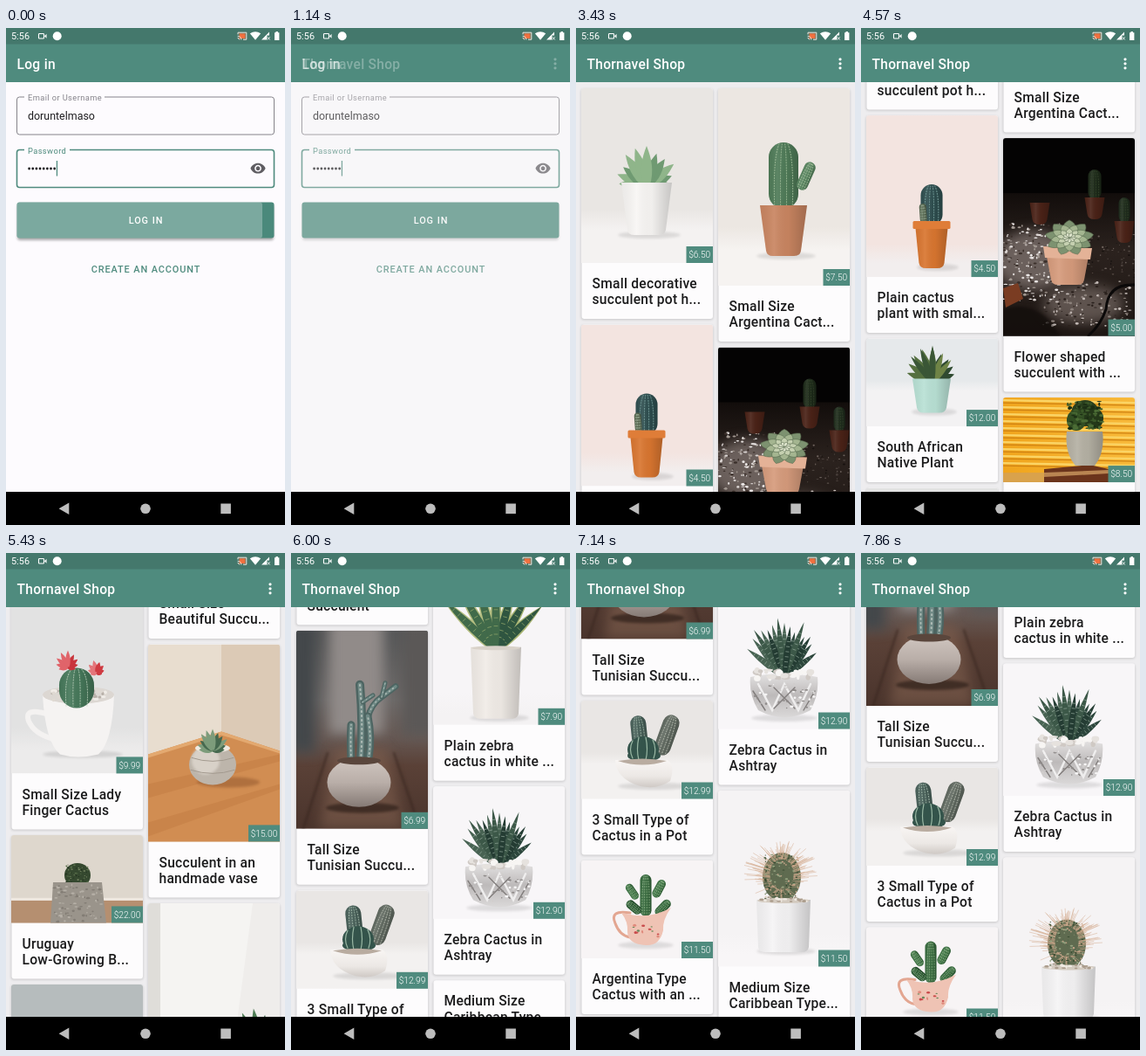
Write an HTML page that moves like this. It is 320 px wide and 569 px high and loops after 8000 ms.

```html
<!DOCTYPE html>
<html lang="en">
<head>
<meta charset="utf-8">
<title>Plant shop</title>
<style>
html, body { margin: 0; width: 100%; height: 100%; overflow: hidden; background: #fdfbfe; }
svg { display: block; }
text { font-family: Roboto, "Noto Sans", sans-serif; white-space: pre; }
.m { font-weight: 500; }
.h { font-size: 15.6px; font-weight: 500; letter-spacing: .27px; }
.c { font-size: 15.6px; font-weight: 500; letter-spacing: .25px; fill: #1b1b1c; }
.p { font-size: 10.2px; font-weight: 300; fill: #fff; }
.soft { filter: blur(1.6px); }
.haze { filter: blur(7px); }
</style>
</head>
<body>
<svg id="stage" width="100%" height="100%" viewBox="0 0 320 569"></svg>
<script>
const TICK = 1000 / 7, LOOP = 8000;
const TEAL = '#4f8b7e', CARD_W = 151, TEXT_H = 64, GAP = 6.5, TOP = 69;
const SHOP = 'Thornavel Shop', USER = 'doruntelmaso';

// ---- drawing helpers, all returning markup ----
const rect = (x, y, w, h, c, more = '') => `<rect x="${x}" y="${y}" width="${w}" height="${h}" fill="${c}" ${more}/>`;
const oval = (x, y, rx, ry, c, more = '') => `<ellipse cx="${x}" cy="${y}" rx="${rx}" ry="${ry}" fill="${c}" ${more}/>`;
const path = (d, c, more = '') => `<path d="${d}" fill="${c}" ${more}/>`;
const line = (d, c, w, more = '') => path(d, 'none', `stroke="${c}" stroke-width="${w}" stroke-linecap="round" ${more}`);
const text = (x, y, s, more = '') => `<text x="${x}" y="${y}" ${more}>${s}</text>`;
const dots = (x, y, n, step, r, c) => Array.from({ length: n }, (_, i) => oval(x + i * step, y, r, r, c)).join('');

// Registers a gradient of [offset, colour, opacity] stops, returns its paint
const defs = [];
function grad(stops, across = false) {
  const id = 'g' + defs.length;
  const s = stops.map(([o, c, a = 1]) => `<stop offset="${o}" stop-color="${c}" stop-opacity="${a}"/>`).join('');
  defs.push(`<linearGradient id="${id}" x2="${+across}" y2="${+!across}">${s}</linearGradient>`);
  return `url(#${id})`;
}
const ROUND = grad([[0, '#000', .05], [.3, '#fff', .08], [.6, '#000', .03], [1, '#000', .2]], true);

function randoms(seed) {
  return () => (seed = (seed * 9301 + 49297) % 233280) / 233280;
}
function specks(seed, n, x, y, w, h, r, colors) {
  const rnd = randoms(seed);
  let s = '';
  for (let i = 0; i < n; i++)
    s += oval((x + rnd() * w).toFixed(1), (y + rnd() * h).toFixed(1), (r * (.4 + rnd())).toFixed(1), (r * (.3 + rnd() * .6)).toFixed(1), colors[i % colors.length]);
  return s;
}
// Leaves fanned around one root, outer ones first
function fan(x, y, n, spread, len, w, c1, c2, stripe = '') {
  const angles = Array.from({ length: n }, (_, i) => (i / (n - 1) - .5) * spread);
  angles.sort((a, b) => Math.abs(b) - Math.abs(a));
  return angles.map((a, i) => {
    const l = len * (.66 + .34 * Math.cos(a * Math.PI / 180)) * (i % 2 ? .86 : 1);
    let s = path(`M-${w * .4} 0C-${w} ${-l * .4} -${w * .6} ${-l * .7} 0 ${-l}C${w * .6} ${-l * .7} ${w} ${-l * .4} ${w * .4} 0z`, i % 2 ? c1 : c2);
    if (stripe) for (let k = 2; k < 9; k++) s += line(`M${-w * .3} ${-l * k / 10}h${w * .6}`, stripe, .7);
    return `<g transform="translate(${x} ${y}) rotate(${a})">${s}</g>`;
  }).join('');
}
// Rings of leaves seen from slightly above
function rosette(x, y, r, colors) {
  let s = '';
  colors.forEach((c, ring) => {
    for (let i = 0; i < 9; i++) {
      const l = r * (1 - ring * .24), w = l * .34;
      s += path(`M0 0C-${w} ${-l * .4} -${w} ${-l * .8} 0 ${-l}C${w} ${-l * .8} ${w} ${-l * .4} 0 0z`, c,
        `transform="rotate(${i * 40 + ring * 20})" stroke="#53664a" stroke-width=".6"`);
    }
  });
  return `<g transform="translate(${x} ${y}) scale(1 .72)">${s}</g>`;
}
function cactus(x, y, w, h, c, rib, turn = 0) {
  let s = rect(-w / 2, -h, w, h, c, `rx="${w / 2}"`) + rect(-w / 2, -h, w, h, ROUND, `rx="${w / 2}"`);
  for (let i = 1; i < 5; i++) {
    const k = (i / 5 - .5) * w;
    s += line(`M${k * .5} ${2 - h}Q${k * 1.2} ${-h * .75} ${k} -2`, rib, .9, 'stroke-dasharray="1 2"');
  }
  return `<g transform="translate(${x} ${y}) rotate(${turn})">${s}</g>`;
}
function pot(x, y, w, base, h, c) {
  const d = `M${x - w / 2} ${y}h${w}L${x + base / 2} ${y + h - 6}q-1 6 -8 6h${16 - base}q-7 0 -8 -6z`;
  return path(d, c) + path(d, ROUND);
}
// Wall and floor meeting in a soft horizon
const room = (h, wall, floorY, floor) =>
  rect(0, 0, CARD_W, h, grad([[0, wall], [floorY / h - .06, wall], [floorY / h + .06, floor]]));
const shade = (x, y, rx) => oval(x, y, rx, 4, '#000', 'opacity=".1" class="soft"');

// ---- pictures, in card coordinates ----
const art = {
  decor: () => room(200, '#e9e6e3', 150, '#f4f2f1') + shade(78, 168, 36) +
    fan(75, 112, 11, 170, 46, 9, '#6f9a72', '#8fb58a') + pot(75, 108, 58, 44, 60, '#f8f6f4'),
  pampa: () => room(226, '#ece7e2', 172, '#f6f3f1') + shade(78, 192, 34) +
    cactus(75, 138, 34, 76, '#4f7b58', '#a9c3a0') + cactus(94, 116, 13, 34, '#5b8762', '#a9c3a0', 24) + pot(75, 134, 54, 40, 58, '#c98561'),
  plain: () => room(185, '#f3e4e0', 158, '#f2eeee') + shade(82, 174, 24) +
    cactus(75, 126, 25, 47, '#2f4f50', '#7fa9a4') + cactus(66, 123, 8, 22, '#55664f', '#9db19a', -4) +
    pot(75, 124, 38, 29, 51, '#d97630') + rect(53.5, 121, 43, 9, '#df7d38', 'rx="1.5"'),
  flower: () => {
    const back = (x, y) => pot(x, y, 23, 17, 25, '#4a2217');
    return rect(0, 0, CARD_W, 227, '#040303') + rect(0, 63, CARD_W, 164, grad([[0, '#120d0b'], [.4, '#2b221e'], [1, '#1d1613']])) +
      oval(34, 140, 44, 34, '#6b605c', 'class="haze"') + oval(92, 190, 46, 22, '#5e534e', 'class="haze"') +
      specks(7, 200, 0, 98, 66, 88, 1.7, ['#d9d3d1', '#a0968f', '#3a2f2a', '#ece8e7']) +
      specks(31, 150, 46, 164, 100, 52, 1.6, ['#c4bbb7', '#8b807a', '#2a211d']) +
      specks(13, 60, 96, 110, 55, 50, 1.2, ['#4d433e', '#6d625c', '#17110f']) +
      path('M0 227V196Q30 186 52 208L66 227z', '#120d0b', 'opacity=".7" class="soft"') +
      cactus(105, 70, 15, 34, '#1d2a19', '#35452c') + back(105, 68) + back(42, 74) +
      cactus(139, 96, 13, 28, '#1f2c1d', '#35452c') + back(139, 95) +
      path('M0 172l17 -6 6 18 -20 10z', '#7a3c22') +
      line('M151 168Q120 166 118 196Q112 214 98 226', '#0b0909', 3) +
      pot(74, 130, 50, 38, 38, '#d69b7c') + path('M46 124L102 126L100 139L48 137z', '#e4b297') +
      rosette(76, 114, 28, ['#7d9270', '#a4b590', '#c5d0b0', '#dde3cb']);
  },
  blinds: () => {
    let s = rect(0, 0, CARD_W, 97, grad([[0, '#f0a41c'], [1, '#f8b93a']], true));
    for (let y = 3; y < 80; y += 8) s += line(`M0 ${y}L151 ${y + 3}`, '#fbd465', 2.4) + line(`M0 ${y + 3}L151 ${y + 6}`, '#cf8212', 1.2);
    return s + rect(0, 86, CARD_W, 11, '#d9a24c') +
      path('M47 82l52 -5 22 5v15H47z', '#6b341c') + path('M47 86l74 -3v4l-74 4z', '#b98552') +
      oval(94, 18, 16, 15, '#2a3f1e') + oval(84, 26, 11, 12, '#314d23') + oval(104, 24, 11, 12, '#243819') +
      specks(3, 80, 74, 4, 40, 33, 2.4, ['#4b6c35', '#1c2f14', '#3a5829']) +
      path('M73 39h41q3 24 -9 39H83q-13 -15 -10 -39z', '#b5b1a4') + path('M73 39h41q3 24 -9 39H83q-13 -15 -10 -39z', ROUND);
  },
  cup: () => room(212, '#e2e2e2', 172, '#ecebeb') + shade(82, 190, 46) +
    line('M42 144Q14 136 20 152Q26 166 46 172', '#f4f2f1', 6) +
    path('M36 122H118Q116 176 100 190Q76 196 56 190Q39 176 36 122z', '#f5f3f2') +
    oval(77, 122, 41, 10, '#dcd7d2') + specks(5, 40, 42, 116, 68, 12, 2.6, ['#f0ece7', '#b8b0a8', '#dfd9d2']) +
    cactus(75, 137, 40, 46, '#46785a', '#c7d9c4') +
    fan(65, 90, 9, 210, 19, 4, '#c9353c', '#e0646a') + fan(98, 96, 8, 220, 14, 4, '#cf3b42', '#e4757a'),
  stone: () => rect(0, 0, CARD_W, 101, '#ded7cd') + rect(0, 73, CARD_W, 28, '#b58f70') + rect(0, 72, CARD_W, 3, '#efe8e0') +
    oval(76, 46, 15, 14, '#35482f') + specks(9, 60, 63, 34, 26, 24, 1, ['#7d8c68', '#1f2e1c', '#59704b']) +
    path('M48 54H104L109 101H45z', '#9a948b') + specks(12, 90, 49, 57, 55, 43, 1.6, ['#b5afa6', '#827c74']),
  misty: () => room(226, '#b6bcbd', 178, '#a9adac') + shade(75, 192, 36) +
    fan(75, 130, 11, 150, 68, 8, '#4e6e5b', '#6c8b74') + pot(75, 128, 58, 46, 66, '#e6e3df'),
  tall: () => {
    const limb = (d, w) => line(d, '#4d6562', w) + line(d, '#6f8985', w * .5) + line(d, '#b0bdb7', w * .2, 'stroke-dasharray="1 4"');
    return rect(0, 0, CARD_W, 227, grad([[0, '#565758'], [.35, '#6d6a69'], [.55, '#655752'], [.68, '#5a4137'], [1, '#4a342c']])) +
      rect(38, -10, 62, 128, '#918b89', 'class="haze"') + rect(-8, -10, 30, 150, '#43474a', 'class="haze"') +
      rect(122, -10, 40, 130, '#5b5857', 'class="haze"') + path('M44 134L26 227H124L104 134z', '#80604f', 'opacity=".6" class="haze"') +
      line('M36 140L8 227M112 140L142 227', '#38261f', 1.6, 'class="soft"') + oval(76, 203, 42, 6, '#241813', 'opacity=".6" class="soft"') +
      limb('M63 148Q62 126 63 108', 9) + limb('M74 148Q77 110 73 62', 10) + limb('M82 100Q86 84 98 76L114 64', 7) +
      limb('M76 82L88 74M98 76L102 60', 5) + limb('M83 146Q87 122 82 98', 9) +
      oval(72, 174, 36.5, 28, grad([[0, '#d0c6c0'], [.5, '#b9aea8'], [1, '#857a75']])) + oval(72, 149, 25, 4.5, '#5a463c');
  },
  three: () => room(113, '#e9e6e4', 66, '#f3f1f0') + shade(84, 98, 42) +
    cactus(68, 52, 18, 35, '#4a625b', '#a6beae', -6) + cactus(90, 62, 19, 48, '#626b62', '#b9beb2', 20) +
    oval(71, 56, 18, 15, '#34544b') + oval(72, 63, 19, 7, '#34544b') +
    line('M59 46Q54 56 59 66M66 42Q63 56 66 68M74 42Q77 56 74 68M82 45Q87 56 83 66', '#9ab8a4', 1.2) +
    path('M39 68H99Q108 74 102 92Q88 102 68 98Q40 90 39 68z', grad([[0, '#f8f5f3'], [.6, '#ece8e5'], [1, '#cfc9c5']])) +
    path('M42 69Q70 78 98 69Q70 64 42 69z', '#b9aca0'),
  pitcher: () => rect(0, 0, CARD_W, 112, '#f7f4f5') + shade(74, 97, 32) +
    cactus(74, 64, 13, 48, '#376a3e', '#8fb488') + cactus(64, 44, 9, 20, '#3f7546', '#8fb488', -34) +
    cactus(84, 42, 10, 22, '#3f7546', '#8fb488', 28) + cactus(68, 60, 10, 20, '#2f5d37', '#8fb488', -50) + cactus(86, 62, 10, 22, '#376a3e', '#8fb488', 44) +
    line('M56 60Q32 56 39 72Q44 86 56 88', '#e3a691', 3) +
    path('M52 61Q78 68 103 54Q93 68 94 80Q90 98 74 97Q54 96 53 82Q54 70 46 60z', '#efc3b4') +
    specks(4, 14, 60, 74, 30, 14, 1.8, ['#c94b4b', '#e08a7c', '#6b8a5c']),
  table: () => rect(0, 0, CARD_W, 227, '#e8ddcf') + path('M84 0H151V126L84 102z', '#dccab6') +
    path('M0 126L84 100L151 122V227H0z', '#d18d52') + path('M0 160L151 126V134L0 176zM0 204L151 160V166L0 220z', '#c27c42', 'opacity=".5"') +
    path('M0 126L84 100L151 122V125L84 104L0 130z', '#e3a970') + oval(92, 158, 36, 6, '#7d4521', 'opacity=".4" class="soft"') +
    oval(74, 138, 27, 23, '#bdb5ab') + oval(66, 133, 16, 16, '#d8d1c8', 'class="soft"') +
    line('M50 130Q74 138 98 130M49 144Q74 152 99 144', '#a39a8f', 1) + oval(74, 119, 20, 5, '#efe9e0') + fan(74, 121, 11, 180, 24, 5, '#46694f', '#7d9c7b'),
  aloe: () => rect(0, 0, CARD_W, 226, '#efedeb') + path('M0 0H14V226H0z', '#dfddd9') + path('M14 0H120L90 226H14z', '#f5f4f2') +
    fan(128, 172, 8, 110, 52, 8, '#2f5a3c', '#4d7b54') + pot(126, 168, 44, 36, 44, '#dcd3c8'),
  zebra: () => room(201, '#f7f5f7', 176, '#f4f2f3') + shade(76, 193, 34) +
    fan(72, 116, 7, 92, 96, 9, '#a9b573', '#b4bd80') + fan(72, 116, 7, 92, 94, 6.6, '#2f5540', '#416a4a', '#93a86c') +
    pot(72, 112, 58, 52, 82, '#f1ece7') + oval(72, 113, 28, 2.5, '#d9d2c9'),
  ashtray: () => rect(0, 0, CARD_W, 152, '#f8f6f8') + shade(76, 139, 38) +
    fan(76, 92, 9, 106, 62, 5.6, '#2c463c', '#486353', '#8ca294') + fan(76, 92, 6, 66, 68, 5.4, '#243c33', '#3c5848', '#8ca294') +
    path('M37 92Q75 84 114 92Q116 112 106 130Q76 146 46 130Q35 112 37 92z', grad([[0, '#e4e2e2'], [.5, '#bdbaba'], [1, '#dad8d8']])) +
    specks(15, 30, 44, 84, 62, 10, 4, ['#f7f5f3', '#e6e2de', '#cfc9c4']) +
    line('M46 100L62 130L76 100L92 130L106 100', '#efeeee', 2.4) + line('M64 104L88 128M88 104L64 128M40 108L54 130M111 108L98 130', '#807c7b', 1.4) +
    specks(18, 50, 40, 100, 72, 34, 1.6, ['#f6f5f5', '#8f8b8a', '#d0cdcc']),
  carib: () => {
    let spines = '';
    const rnd = randoms(21);
    for (let i = 0; i < 150; i++) {
      const a = rnd() * 6.28, r = 22 + rnd() * 22, x = 73 + Math.cos(a) * 14, y = 96 + Math.sin(a) * 18;
      spines += `M${x.toFixed(1)} ${y.toFixed(1)}L${(73 + Math.cos(a) * r).toFixed(1)} ${(92 + Math.sin(a) * r * .8).toFixed(1)}`;
    }
    return room(202, '#f5f3f4', 176, '#f8f6f7') + shade(78, 184, 34) +
      oval(73, 99, 22, 28, '#5f6b50') + line(spines, '#d2ab8e', .5) +
      specks(17, 150, 53, 73, 40, 52, 1.3, ['#37492f', '#93a07e', '#c9a58a', '#55664a']) +
      pot(75, 125, 62, 58, 60, '#f5f4f5') + oval(75, 126, 30, 3, '#d3cabf') + specks(8, 26, 48, 122, 54, 6, 2, ['#efe9e2', '#ab9c8c']);
  },
  agave: () => room(101, '#e6e9eb', 54, '#f3f2f3') + shade(78, 84, 26) +
    fan(76, 50, 9, 140, 40, 6.4, '#2f4a30', '#55703f') + fan(76, 50, 5, 80, 42, 5, '#6f8446', '#3a5636') + pot(75, 46, 44, 34, 39, '#b9e1d5')
};

// column, picture height, price, title lines, picture
const cards = [
  [0, 200, '6.50', 'Small decorative', 'succulent pot h...', 'decor'],
  [1, 226, '7.50', 'Small Size', 'Argentina Cact...', 'pampa'],
  [0, 185, '4.50', 'Plain cactus', 'plant with smal...', 'plain'],
  [1, 226.5, '5.00', 'Flower shaped', 'succulent with ...', 'flower'],
  [1, 97, '8.50', 'Small Size', 'Beautiful Succu...', 'blinds'],
  [1, 226, '15.00', 'Succulent in an', 'handmade vase', 'table'],
  [0, 100.5, '12.00', 'South African', 'Native Plant', 'agave'],
  [0, 212, '9.99', 'Small Size Lady', 'Finger Cactus', 'cup'],
  [0, 100.5, '22.00', 'Uruguay', 'Low-Growing B...', 'stone'],
  [1, 226, '9.50', 'Long Leaf', 'Aloe Plant', 'aloe'],
  [0, 226, '8.90', 'Mexican Type', 'Succulent', 'misty'],
  [1, 201, '7.90', 'Plain zebra', 'cactus in white ...', 'zebra'],
  [0, 227, '6.99', 'Tall Size', 'Tunisian Succu...', 'tall'],
  [1, 151.5, '12.90', 'Zebra Cactus in', 'Ashtray', 'ashtray'],
  [0, 112.5, '12.99', '3 Small Type of', 'Cactus in a Pot', 'three'],
  [1, 201.5, '11.50', 'Medium Size', 'Caribbean Type...', 'carib'],
  [0, 112, '11.50', 'Argentina Type', 'Cactus with an ...', 'pitcher']
].map(([col, h, price, a, b, pic]) => ({ col, h, price, a, b, pic, loads: 2900 }));
// the last row is fetched only when it scrolls into view
cards.slice(-2).forEach(c => c.loads = 6050);

const colX = [6, 163], feet = [TOP, TOP];
cards.forEach((c, i) => {
  c.y = feet[c.col];
  feet[c.col] += c.h + TEXT_H + GAP;
  c.early = { x: colX[i % 2], y: TOP + (i >> 1) * (TEXT_H + GAP) };
});

function cardMarkup(c, i) {
  const w = c.price.length > 4 ? 36 : 30.5;
  return `<g id="card${i}">` +
    rect(-.2, 1, CARD_W + .4, 0, '#000', 'class="box soft" rx="3" opacity=".16"') + rect(.5, 0, CARD_W - .5, 0, '#fdfcfd', 'class="box" rx="3"') +
    `<g class="pic" clip-path="url(#corner)"><svg width="${CARD_W}" height="${c.h}">${art[c.pic]()}</svg>` +
    rect(CARD_W - w, c.h - 19, w, 19, TEAL) + text(CARD_W - w / 2, c.h - 5.8, '$' + c.price, 'class="p" text-anchor="middle"') + '</g>' +
    `<g class="cap">${text(12.5, 29.2, c.a, 'class="c"')}${text(12.5, 47.4, c.b, 'class="c"')}</g></g>`;
}

const field = (y, c, w, label, lw) =>
  rect(12.5, y, 295, 43, 'none', `rx="3" stroke="${c}" stroke-width="${w}"`) + rect(21, y - 3, lw, 6, '#fdfbfe') +
  text(25, y + 4, label, `font-size="9.3" letter-spacing=".4" fill="${c}"`);
const EYE = 'M12 4.5C7 4.5 2.73 7.61 1 12c1.73 4.39 6 7.5 11 7.5s9.27-3.11 11-7.5c-1.73-4.39-6-7.5-11-7.5zM12 17c-2.76 0-5-2.24-5-5s2.24-5 5-5 5 2.24 5 5-2.24 5-5 5zm0-8c-1.66 0-3 1.34-3 3s1.34 3 3 3 3-1.34 3-3-1.34-3-3-3z';

const login = '<g id="login">' + rect(0, 62, 320, 470, '#fdfbfe') +
  field(79, '#85838a', 1, 'Email or Username', 92) + text(25, 105.3, USER, 'font-size="12.45" fill="#1e1d20"') +
  field(139.5, TEAL, 1.6, 'Password', 52) + dots(26.6, 161, 8, 4.15, 1.4, '#1e1d20') +
  rect(57.8, 152, 1.3, 17.5, TEAL, 'id="caret"') + path(EYE, '#5f5d62', 'transform="translate(279.7 151.3) scale(.778)"') +
  rect(13, 202, 294, 41, '#000', 'id="lift" class="soft" rx="3"') + rect(12.5, 199.5, 295, 41, '#4a897b', 'rx="3"') +
  rect(12.5, 199.5, 295, 41, '#fff', 'id="ripple" rx="3"') +
  text(160.5, 224, 'LOG IN', 'class="m" font-size="10.9" letter-spacing=".95" fill="#fff" text-anchor="middle"') +
  text(160.5, 280, 'CREATE AN ACCOUNT', `class="m" font-size="10.9" letter-spacing=".9" fill="${TEAL}" text-anchor="middle"`) + '</g>';

const sheet = '<g id="sheet">' + rect(0, 334, 320, 198, '#f8f7fa') + oval(21.5, 356, 9, 9, '#4285f4') +
  text(37, 360, 'Save password to Zorund?', 'font-size="12.5" fill="#202124"') +
  text(12.5, 391, 'Username', 'font-size="10.1" fill="#77777c"') + text(12.5, 410, USER, 'font-size="11.6" fill="#202124"') +
  text(12.5, 438, 'Password', 'font-size="10.1" fill="#77777c"') + dots(16, 452.5, 8, 7.7, 1.15, '#202124') +
  text(189.5, 505, 'Not now', 'class="m" font-size="10.9" fill="#1a73e8"') +
  rect(242, 486, 63, 29.5, '#146fec', 'rx="3.5"') + rect(242, 486, 63, 29.5, '#fff', 'id="press" rx="3.5"') +
  text(273.5, 505, 'Save', 'class="m" font-size="10.9" fill="#fff" text-anchor="middle"') + '</g>';

const bars = rect(0, 0, 320, 62, TEAL) + rect(0, 0, 320, 18.5, '#44786c') +
  text(6, 13.2, '5:56', 'font-size="10.9" fill="#fff"') +
  rect(37.5, 6.5, 6, 5.5, 'none', 'rx=".8" stroke="#fff" stroke-width="1.1"') + path('M44 9.2l2.5 -2.4v5z', '#fff') +
  oval(58.7, 9.2, 5, 5, '#fff') +
  rect(267.5, 6.3, 7, 5.8, '#f0703f') + line('M266 7V5.2h9.8v8h-3.4M266 9.3q3.6 0 3.8 3.7M266 11.4q1.5 0 1.6 1.6', '#f8e6de', 1) +
  path('M279.8 6.3Q286 2.2 292.2 6.3L286 13.8z', '#fff') + path('M293 13.6L302 4.6V8.6H299.4V13.6z', '#fff') +
  line('M300.4 10.6l2 2.6m0 -2.6l-2 2.6', '#fff', .8) + path('M308 5.2h1.5V4h2.4v1.2h1.5v8.8H308z', '#fff') +
  text(12.5, 46.5, 'Log in', 'id="loginTitle" class="h" fill="#fff"') +
  '<g id="shopTitle">' + text(12.5, 46.5, SHOP, 'class="h" fill="#fff"') +
  [35.8, 40.8, 45.8].map(y => oval(303, y, 1.6, 1.6, '#fff')).join('') + '</g>';

const nav = rect(0, 531, 320, 38, '#000') + path('M60.6 550.3L72.3 543.6v13.4z', '#bdbdbd') +
  oval(160, 550.3, 5.8, 5.8, '#bdbdbd') + rect(246.3, 544.5, 11.6, 11.6, '#bdbdbd');

const shop = '<g id="shop">' + rect(0, 62, 320, 470, '#eeedef') + '<g id="list">' + cards.map(cardMarkup).join('') + '</g></g>';
const corner = `<clipPath id="corner">${rect(0, 0, CARD_W, 300, '#000', 'rx="3"')}</clipPath>`;
const stage = document.getElementById('stage');
stage.innerHTML = `<defs>${corner}${defs.join('')}</defs>` + login + shop + sheet + bars + nav;

const $ = id => document.getElementById(id);
const set = (el, a) => { for (const k in a) el.setAttribute(k, a[k]); };
const clamp = v => Math.max(0, Math.min(1, v));
const ramp = (t, a, b) => clamp((t - a) / (b - a));
cards.forEach((c, i) => {
  c.el = $('card' + i);
  c.box = c.el.querySelectorAll('.box');
  c.art = c.el.querySelector('.pic');
  c.cap = c.el.querySelector('.cap');
});

// time, list offset, speed in px per ms
const flings = [[4200, 0, .1], [4571.4, 239.4, .8], [5428.6, 725.6, .4], [6000, 1427.2, .5], [7142.9, 1644.5, 0], [7857.1, 1568, -.06], [8000, 1562, 0]];
function scrollAt(t) {
  if (t <= flings[0][0]) return 0;
  const i = Math.max(1, flings.findIndex(f => t <= f[0] + .1));
  const [t0, y0, v0] = flings[i - 1], [t1, y1, v1] = flings[i];
  const d = t1 - t0, u = (t - t0) / d, w = 1 - u;
  return y0 * (1 + 2 * u) * w * w + v0 * d * u * w * w + y1 * u * u * (3 - 2 * u) - v1 * d * u * u * w;
}

function draw(ms) {
  const t = Math.floor((ms + 5) / TICK) * TICK;

  const toShop = ramp(t, 1020, 1420);
  set($('shop'), { opacity: toShop });
  set($('shopTitle'), { opacity: toShop });
  set($('loginTitle'), { opacity: 1 - toShop });

  const fade = 1 - ramp(t, 140, 420);
  set($('ripple'), { width: t < 100 ? 281.5 : 295, opacity: .27 * fade });
  set($('lift'), { opacity: .2 + .12 * fade });
  set($('caret'), { opacity: t < 400 || (t > 840 && t < 1380) ? 1 : 0 });

  const up = ramp(t, 1600, 1850), down = ramp(t, 2600, 2990);
  set($('sheet'), { transform: `translate(0 ${198 * ((1 - up) ** 2 + down * down)})` });
  set($('press'), { opacity: t > 2560 ? .22 : 0 });

  const grown = t > 2990, y = scrollAt(t);
  set($('list'), { opacity: t > 2280 ? 1 : 0 });
  for (const c of cards) {
    const h = grown && t > c.loads ? c.h : 0;
    const x = grown ? colX[c.col] : c.early.x, top = grown ? c.y - y : c.early.y;
    const seen = top < 540 && top + h + TEXT_H > 55;
    c.el.style.display = seen ? '' : 'none';
    if (!seen) continue;
    set(c.el, { transform: `translate(${x} ${top.toFixed(2)})` });
    c.box.forEach(b => set(b, { height: h + TEXT_H }));
    set(c.cap, { transform: `translate(0 ${h})` });
    set(c.art, { opacity: ramp(t, c.loads, c.loads + 520) });
  }
}

function loop(now) {
  draw(now % LOOP);
  requestAnimationFrame(loop);
}
draw(0);
requestAnimationFrame(loop);
</script>
</body>
</html>
```
